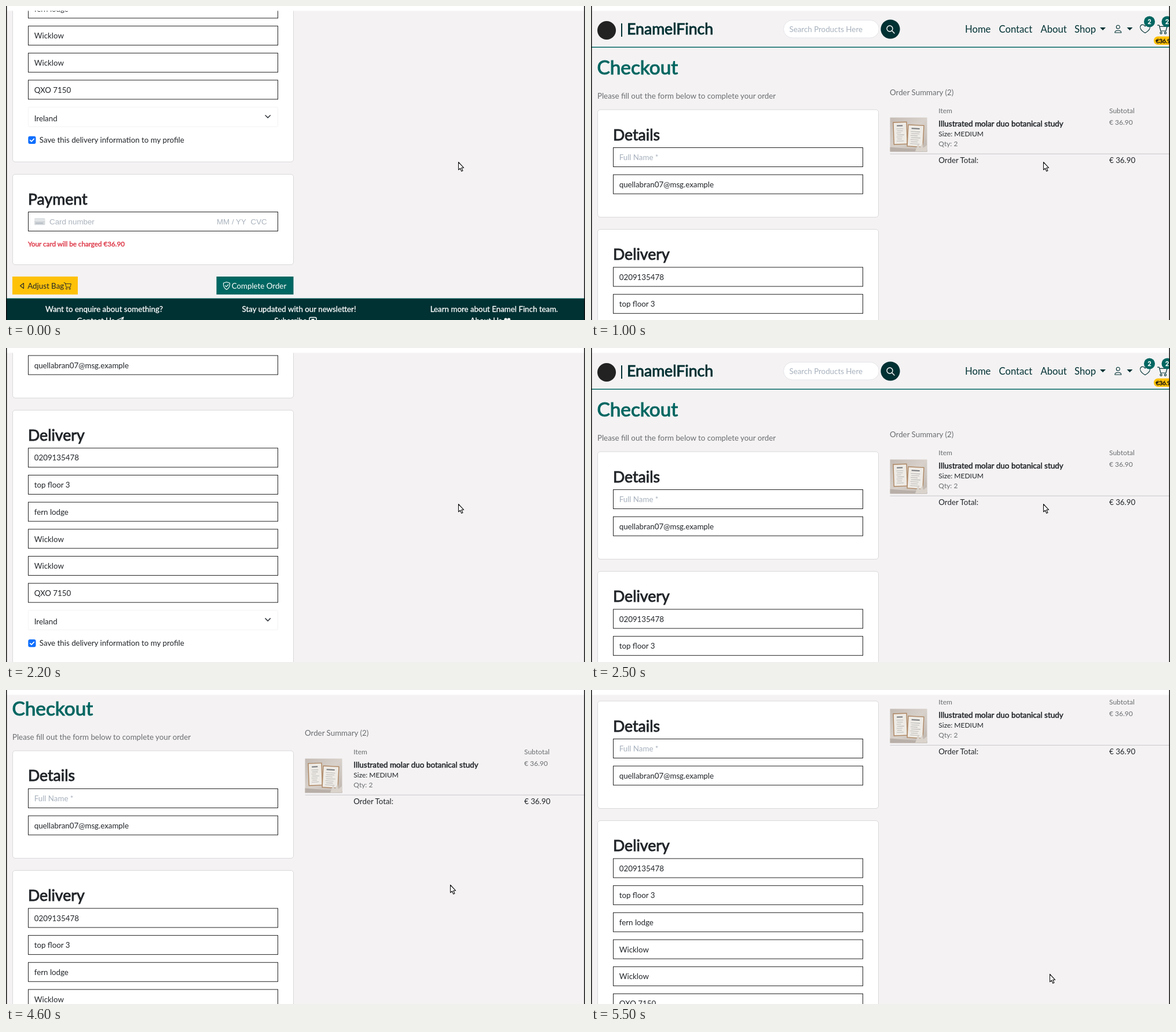
An HTML page for the animation above (5.9 s loop, 1000 px wide and 542 px high).

```html
<!DOCTYPE html>
<html lang="en">
<head>
<meta charset="utf-8">
<title>Checkout</title>
<style>
html, body { margin: 0; width: 100%; height: 100%; overflow: hidden; background: #f4f2f3; }
svg { display: block; width: 100%; height: 100%; font-family: Lato, "Open Sans", sans-serif; }
text { white-space: pre; }
</style>
</head>
<body>
<svg id="stage" viewBox="0 0 1000 542"></svg>
<script>
const INK = '#212529', GREY = '#6a6d70', TEAL = '#006661', DARK = '#003133', HINT = '#a7b1bd';
const END = 556.4;

// bold > 0 thickens the glyphs without changing their advance
const text = (x, y, s, { size = 13.33, fill = INK, bold = 0, extra = '' } = {}) =>
  `<text x="${x}" y="${y}" font-size="${size}" fill="${fill}"` +
  (bold ? ` stroke="${fill}" stroke-width="${bold}"` : '') + ` ${extra}>${s}</text>`;
const rect = (x, y, w, h, fill, extra = '') =>
  `<rect x="${x}" y="${y}" width="${w}" height="${h}" fill="${fill}" ${extra}/>`;
const circle = (x, y, r, fill) => `<circle cx="${x}" cy="${y}" r="${r}" fill="${fill}"/>`;
const line = (d, color, width = 1.1, fill = 'none') =>
  `<path d="${d}" fill="${fill}" stroke="${color}" stroke-width="${width}" stroke-linejoin="round" stroke-linecap="round"/>`;
const shape = (d, fill) => `<path d="${d}" fill="${fill}"/>`;

const card = (y, h) => rect(11.5, y, 485, h, '#fff', 'rx="4.5" stroke="#dad9db"');
const heading = (y, s) => text(38, y, s, { size: 26.67, bold: .9 });
const box = y => rect(38.5, y, 431, 33, '#fff', 'stroke="#222"');
const field = (y, s, fill = INK) => box(y) + text(48.7, y + 21.7, s, { fill });
const caret = (x, y) => shape(`M${x} ${y}h10l-5 5z`, DARK);
const cart = (x, y, k, color) => `<g transform="translate(${x} ${y}) scale(${k})">` +
  line('M0 1h2.5l2.4 9h8.2l1.9-7H3', color, 1.1) +
  `<g fill="none" stroke="${color}"><circle cx="5.5" cy="13.2" r="1.5"/><circle cx="12.2" cy="13.2" r="1.5"/></g></g>`;
const badge = x => circle(x, 27, 9.5, TEAL) +
  text(x, 30.7, '2', { size: 10.5, fill: '#fff', bold: .6, extra: 'text-anchor="middle"' });

function poster(x, y, w, h, tilt) {
  let s = rect(x, y, w, h, '#eeebe6', 'stroke="#ad8560" stroke-width="1.4"');
  s += rect(x + 6, y + 5, w - 13, 2, '#75777a');
  for (let i = 0; i < 7; i++)
    s += rect(x + 5 + i % 2, y + 11 + i * 3.5, w - 11 - i % 3 * 2, .8, '#aaa9a8');
  return `<g transform="rotate(${tilt} ${x} ${y})">${s}</g>`;
}

const photo = rect(516.5, 192.5, 64, 59, 'url(#wall)') +
  shape('M516.5 251.5v-8l25 2 39 3v3z', '#b8afa8') +
  poster(522, 201, 23, 38, -2) + poster(548, 205, 27, 37, 3) +
  shape('M560 251l5-14 3 8 5-9 1 9 6-5v11z', '#d9d3cc');

const nav = circle(27, 42, 16, '#222') +
  rect(52, 30, 2, 23, DARK) +
  text(62, 49, 'EnamelFinch', { size: 26.67, fill: DARK, bold: .9 }) +
  rect(332.5, 24.5, 165, 30.5, '#fff', 'rx="15.2" stroke="#e4e4e8"') +
  text(342.5, 44.7, 'Search Products Here', { fill: HINT }) +
  circle(517, 40, 16.6, DARK) +
  line('M519.8 42.8l4.2 4.2M521 39a5 5 0 1 1-10 0a5 5 0 1 1 10 0', '#fff', 1.4) +
  [[646, 'Home'], [704.5, 'Contact'], [776.5, 'About'], [835, 'Shop']]
    .map(([x, s]) => text(x, 46, s, { size: 16.67, fill: DARK })).join('') +
  caret(879, 37) + caret(925.5, 37) +
  line('M913.3 36.2a3 3 0 1 1-6 0a3 3 0 1 1 6 0M904.8 46c0-5 11-5 11 0z', DARK) +
  line('M957 46.5c-17-10-4-19 0-11.5c4-7.500 17 1.500 0 11.500z', DARK, 1.2) +
  cart(978.5, 32, 1.1, DARK) + badge(964.5) + badge(995) +
  rect(972, 52.500, 40, 14.500, '#ffc107', 'rx="7.2"') +
  text(975.5, 63.500, '€36.90', { size: 10, fill: '#111', bold: .55 }) +
  rect(0, 70.4, 1000, 1.5, TEAL);

const small = (x, y, s, fill = GREY) => text(x, y, s, { size: 12, fill });
const summary = text(516, 153.5, 'Order Summary (2)', { fill: GREY }) +
  small(600.3, 184.6, 'Item') + small(895, 184.6, 'Subtotal') + photo +
  text(600.3, 207.6, 'Illustrated molar duo botanical study', { size: 13.5, bold: .5 }) +
  small(895, 205.2, '€ 36.90') + small(600.3, 225, 'Size: MEDIUM', INK) + small(600.3, 242.4, 'Qty: 2') +
  rect(516.5, 254.8, 484, 1, '#c9c8ca') +
  text(600.3, 270.8, 'Order Total:') + text(895, 270.8, '€ 36.90');

const form = text(10.5, 118, 'Checkout', { size: 33.33, fill: TEAL, bold: 1.05 }) +
  text(11, 160.3, 'Please fill out the form below to complete your order', { fill: GREY }) +
  card(179, 185.5) + heading(231.5, 'Details') +
  field(244.5, 'Full Name *', HINT) + field(291.2, 'quellabran07@msg.example') +
  card(385.5, 440) + heading(438, 'Delivery') +
  ['0209135478', 'top floor 3', 'fern lodge', 'Wicklow', 'Wicklow', 'QXO 7150']
    .map((s, i) => field(451 + i * 46.67, s)).join('');

const pay = (x, s) => text(x, 376.8, s, { fill: '#aab3bd', extra: 'font-family="Liberation Sans, Arial, sans-serif"' });
const foot = (x, y, s) => text(x, y, s, { fill: '#fff', bold: .3, extra: 'text-anchor="middle"' });
const lower = rect(38.5, 174.5, 431, 34, '#fff', 'rx="2" stroke="#f3f3f4"') +
  text(48.7, 198.5, 'Ireland') + line('M448 188.700l4.200 4.200 4.200-4.200', '#343a40', 1.5) +
  rect(38.3, 224.8, 13.2, 13.2, '#0d6efd', 'rx="3"') + line('M41.700 231.600l2.300 2.300 4.300-4.500', '#fff', 1.7) +
  text(57.8, 236.3, 'Save this delivery information to my profile') +
  card(290.500, 156) + heading(342.600, 'Payment') + box(355.5) +
  rect(49, 366.5, 18.500, 11.500, '#d5d9dc', 'rx="1.5"') + rect(49, 368.500, 18.500, 2, '#eceef0') +
  rect(51, 374, 13, 1.500, '#aab3bd') +
  pay(75, 'Card number') + pay(364, 'MM / YY') + pay(422.5, 'CVC') +
  text(38, 415, 'Your card will be charged €36.90', { size: 11.67, fill: '#dc3545', bold: .4 }) +
  rect(11, 467, 113, 31, '#ffc107') + line('M30.5 478.500v9l-6-4.500z', INK) +
  text(37.2, 487.700, 'Adjust Bag') + cart(100, 477, .83, INK) +
  rect(363.500, 467, 133, 31, TEAL) +
  line('M381 476.5l5.500 1.700c.5 6-2 9.300-5.500 11.300c-3.500-2-6-5.300-5.500-11.300zM378.500 482.700l2 2 3.500-3.700', '#fff') +
  text(389.700, 487.700, 'Complete Order', { fill: '#fff' }) +
  rect(0, 505, 1000, 60, DARK) + rect(0, 504.500, 1000, 1, TEAL) +
  foot(169.5, 527.700, 'Want to enquire about something?') +
  foot(506, 527.700, 'Stay updated with our newsletter!') +
  foot(843, 527.700, 'Learn more about Enamel Finch team.') +
  foot(155, 547.500, 'Contact Us') + foot(491.500, 547.500, 'Subscribe') + foot(829, 547.500, 'About Us') +
  line('M190 543l13-6-3 11-4-3zM203 537l-7 8', '#fff') +
  rect(524, 537.500, 12, 11, 'none', 'rx="2" stroke="#fff" stroke-width="1.5"') + rect(527.5, 540, 5, 8, '#fff') +
  circle(863, 541, 2.600, '#fff') + circle(868.500, 541, 2.600, '#fff') + rect(860, 544, 11, 5, '#fff', 'rx="2"');

document.getElementById('stage').innerHTML = `
  <defs>
    <linearGradient id="wall" x2="1" y2="1"><stop stop-color="#c4bbb4"/><stop offset=".5" stop-color="#d8d1cb"/><stop offset="1" stop-color="#bdb4ad"/></linearGradient>
    <linearGradient id="strip" x2="0" y2="1"><stop offset=".75" stop-color="#fff"/><stop offset="1" stop-color="#fff" stop-opacity="0"/></linearGradient>
  </defs>
  ${rect(0, 0, 1000, 542, '#f4f2f3')}
  <g id="page">${nav}${form}${summary}<g transform="translate(0 ${END})">${lower}</g></g>
  ${rect(0, 0, 1000, 9.6, 'url(#strip)')}
  ${rect(0, 0, 1.5, 542, '#111')}${rect(998.5, 0, 1.5, 542, '#111')}
  <g id="cursor">${line('M.5 .5v13.300l3-2.700 2.200 5.200 2.200-1-2.200-5h4z', '#111', 1.1, '#fff')}</g>`;

const page = document.getElementById('page'), cursor = document.getElementById('cursor');
const LOOP = 5900, STEP = 100;
const smooth = u => u * u * (3 - 2 * u);
const brake = u => 1 - (1 - u) ** 2.161;

// start, end, from, to, easing
const scrolls = [
  [300, 900, END, 0, smooth],
  [1000, 1500, 0, END, smooth],
  [1900, 2500, END, 0, smooth],
  [4500, 4900, 0, 160, brake],
];
// time, x, y
const path = [
  [0, 781, 269], [3300, 781, 269], [3500, 660, 297], [3800, 660, 297], [3900, 712, 290],
  [4000, 764, 293], [4100, 768, 322], [4200, 767, 336], [4800, 767, 336],
  [5100, 776, 495], [5500, 792, 490], [LOOP, 792, 490],
];

function scrollAt(t) {
  const [a, b, from, to, ease] = scrolls.findLast(s => t >= s[0]) || scrolls[0];
  const u = Math.min(1, Math.max(0, (t - a) / (b - a)));
  return from + (to - from) * ease(u);
}

function cursorAt(t) {
  const i = path.findIndex(p => p[0] > t);
  const [a, x, y] = path[i - 1], [b, x2, y2] = path[i], u = (t - a) / (b - a);
  return [x + (x2 - x) * u, y + (y2 - y) * u];
}

const start = performance.now();
function draw() {
  const elapsed = (performance.now() - start) % LOOP;
  const t = Math.floor(elapsed / STEP) * STEP;
  page.setAttribute('transform', `translate(0 ${-scrollAt(t)})`);
  cursor.setAttribute('transform', `translate(${cursorAt(t)})`);
  requestAnimationFrame(draw);
}
draw();
</script>
</body>
</html>
```
